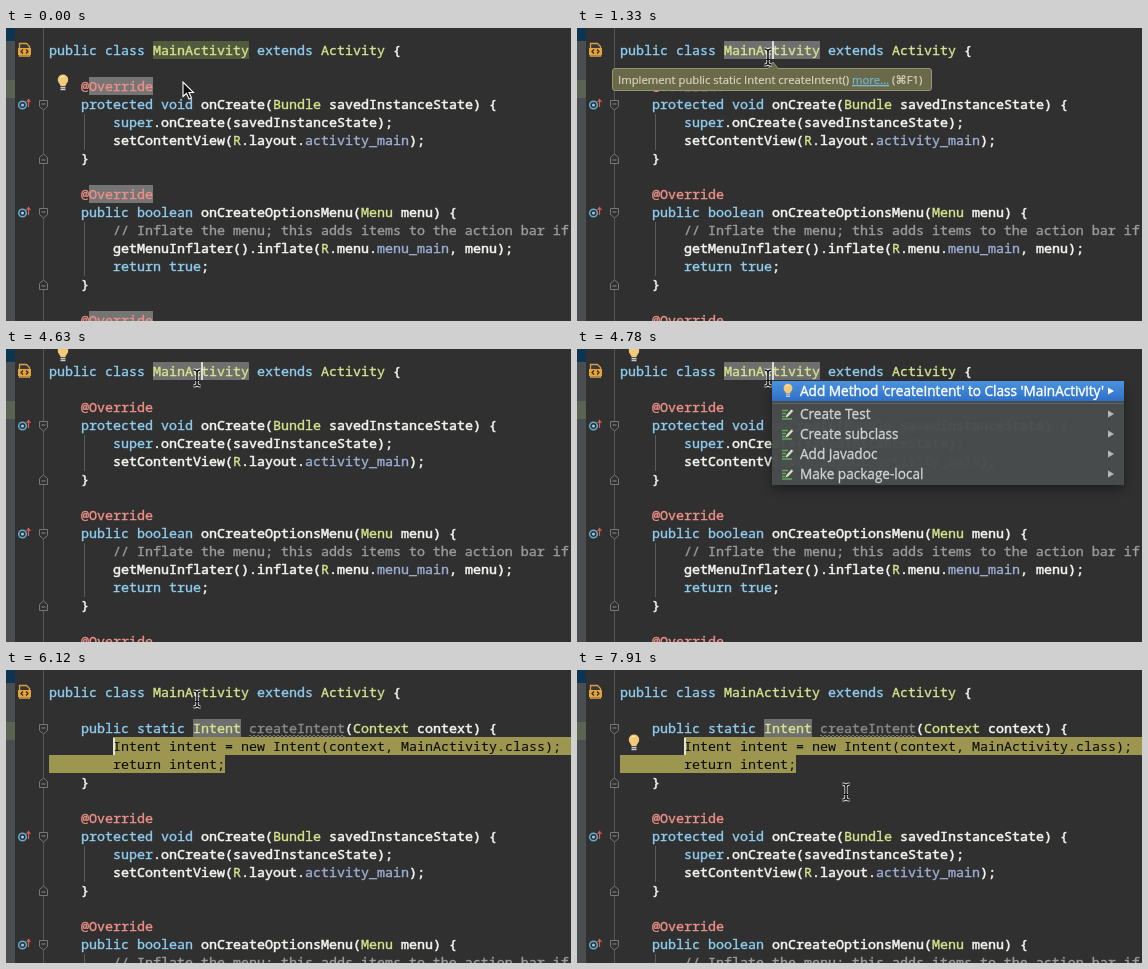
An HTML page that plays this animation: 565x293 px, repeating every 8.01 s.

```html
<!DOCTYPE html>
<html lang="en">
<head>
<meta charset="utf-8">
<style>
  html, body { margin: 0; width: 100%; height: 100%; overflow: hidden; background: #303030; }
  svg { display: block; width: 565px; height: 293px; }
  text { white-space: pre; }
  text, tspan { fill: currentColor; stroke: currentColor; }
  .code { font: 500 13.333px "Noto Sans Mono", "DejaVu Sans Mono", monospace; color: #f6f6f2; stroke-width: .5px; }
  .menu { font: 500 13.6px "Open Sans", "Noto Sans", sans-serif; color: #d2d2d2; stroke-width: .3px; }
  .menu.active { color: #fff; stroke-width: .4px; }
  .tip { font: 500 11.3px "Open Sans", "DejaVu Sans", sans-serif; color: #d8d6bd; stroke-width: .2px; }
  .link { color: #74b9d8; text-decoration: underline; }
  .key { color: #8fcdf0; stroke-width: .35px; }
  .type { color: #d8e48c; stroke-width: .35px; }
  .note { color: #ee9088; stroke-width: .35px; }
  .field { color: #9fb0d6; stroke-width: .35px; }
  .comment { color: #9c9c9c; stroke-width: .35px; }
  .unused { color: #8a8a8a; stroke-width: .35px; }
  .plain .type { color: #f6f6f2; stroke-width: .5px; }
  .code .ink, .code .ink tspan { color: #0c0c08; stroke-width: .1px; }
</style>
</head>
<body>
<svg id="stage" viewBox="0 0 565 293" xmlns="http://www.w3.org/2000/svg">
  <defs>
    <linearGradient id="blue" x2="0" y2="1">
      <stop stop-color="#4a92de"/><stop offset="1" stop-color="#2f70c8"/>
    </linearGradient>
    <filter id="shadow" x="-10%" y="-20%" width="120%" height="150%">
      <feDropShadow dx="0" dy="5" stdDeviation="6" flood-color="#000" flood-opacity=".4"/>
    </filter>
    <g id="bulb">
      <path d="M-2.500 3C-2.500 1-5.200 0-5.200-3.500A5.200 5 0 0 1 5.200-3.500C5.200 0 2.500 1 2.500 3Z" fill="#f3ca7a"/>
      <path d="M-2.500-5.500Q-1-7 1-6.500" fill="none" stroke="#fff0c4"/>
      <path d="M-2.500 4.500H2.500M-2.500 6.500H2.500" stroke="#c8c8c8" stroke-width="1.300"/>
    </g>
    <g id="override">
      <circle cx="-1.500" cy="1" r="3.800" fill="#303030" stroke="#62acd0" stroke-width="1.500"/>
      <circle cx="-1.500" cy="1" r="1.600" fill="#8cc6e0"/>
      <path d="M4.500 3V-4M2.500-2L4.500-4.500L6.500-2" fill="none" stroke="#d95f55" stroke-width="1.200"/>
    </g>
    <g id="fold">
      <path d="M-4-4.500H4V1.500L0 5L-4 1.500Z" fill="#303030" stroke="#777"/>
      <path d="M-2-1H2" stroke="#8a8a8a"/>
    </g>
    <g id="pencil">
      <path d="M-6-3.500H0M-6-.5H-2M-6 2.500H-3M-6 5H4" stroke="#62a958" stroke-width="1.400"/>
      <path d="M-3 4L-2 1L3.500-5L5.500-3L0 3Z" fill="#dcdccf" stroke="#45553f" stroke-width=".7"/>
    </g>
    <g id="beamShape">
      <path d="M-3.500-8Q0-8 0-5Q0-8 3.500-8M0-5.500V5.500M-3.500 8Q0 8 0 5Q0 8 3.500 8M-2 2.500H2" fill="none"/>
    </g>
  </defs>

  <rect width="565" height="293" fill="#303030"/>
  <rect width="9" height="293" fill="#4b4e50"/>
  <rect width="9" height="13" fill="#0d3552"/>
  <rect y="52" width="9" height="18" fill="#5a6452"/>
  <path d="M37.500 0V293" stroke="#565656"/>
  <g>
    <path d="M13.500 28V15.500H20.500L23.500 18.500V28Z" fill="#3a3834" stroke="#d9a04a" stroke-width="1.300"/>
    <rect x="12" y="20" width="13" height="7" fill="#e3a33f"/>
    <path d="M17 21.500L15 23.500L17 25.500M20 21.500L22 23.500L20 25.500" fill="none" stroke="#33270f" stroke-width="1.200"/>
  </g>

  <rect id="classMark" x="147" y="13" width="96" height="18"/>
  <g id="head" class="code"></g>
  <g id="method">
    <rect x="107" y="67" width="458" height="18" fill="#9c9650"/>
    <rect x="43" y="85" width="176" height="18" fill="#9c9650"/>
    <rect id="intentMark" x="187" y="49" width="48" height="18" fill="#6f6f6f"/>
    <g id="methodText" class="code"></g>
    <path id="wave" fill="none" stroke="#8a8a8a" stroke-width=".8"/>
    <g id="methodFolds"></g>
    <path d="M108 68V85" stroke="#fff" stroke-width="1.500"/>
  </g>
  <g id="rest">
    <g id="noteMarks" fill="#757575"></g>
    <path d="M78.500 86V122M78.500 194V248" stroke="#5a5a5a"/>
    <g id="restText" class="code"></g>
    <g id="gutter"></g>
  </g>

  <path id="caret" d="M196 13V31" stroke="#fff" stroke-width="1.500"/>
  <use id="lamp" href="#bulb"/>

  <g id="tip">
    <path d="M38 40.500H191L196 34L201 40.500H352Q354.500 40.500 354.500 43V60Q354.500 62.500 352 62.500H38Q35.500 62.500 35.500 60V43Q35.500 40.500 38 40.500Z" fill="#6a6a4a" stroke="#96957a"/>
    <text class="tip" x="41" y="56">Implement public static Intent createIntent() <tspan class="link">more...</tspan> (⌘F1)</text>
  </g>

  <g id="menu">
    <rect x="195" y="32" width="352" height="104" fill="#494c4e" fill-opacity=".96" filter="url(#shadow)"/>
    <rect x="195" y="32" width="352" height="20" fill="url(#blue)"/>
    <path d="M196 54.500H546" stroke="#626567"/>
    <g id="items"></g>
  </g>

  <path id="arrow" d="M0 0V14.500L3.500 11.500L6 17L8.500 16L6 10.500H10.500Z" fill="#111" stroke="#fff" stroke-width="1.100"/>
  <g id="beam">
    <use href="#beamShape" stroke="#fff" stroke-width="3"/>
    <use href="#beamShape" stroke="#111" stroke-width="1.600"/>
  </g>
</svg>
<script>
const LOOP = 8010, CELL = 8, ROW = 18, LEFT = 43;
const $ = id => document.getElementById(id);

const kinds = {
  key: "public class extends protected void super boolean return true static new".split(" "),
  type: "MainActivity Activity Bundle R Menu Intent Context".split(" "),
  field: ["activity_main", "menu_main"]
};

function add(parent, tag, attrs = {}, content = "") {
  const el = document.createElementNS("http://www.w3.org/2000/svg", tag);
  for (const name in attrs) el.setAttribute(name, attrs[name]);
  el.textContent = content;
  parent.appendChild(el);
  return el;
}

function kindOf(word) {
  if (word.startsWith("@")) return "note";
  if (word.startsWith("//")) return "comment";
  return Object.keys(kinds).find(kind => kinds[kind].includes(word)) || "";
}

function codeLine(parent, row, indent, source) {
  const line = add(parent, "text", { x: LEFT + indent * CELL, y: 27 + row * ROW });
  for (const word of source.match(/\/\/.*|@?\w+|[^\w@/]+/g)) {
    add(line, "tspan", { class: kindOf(word) }, word);
  }
  return line;
}

function foldPair(parent, top, bottom) {
  add(parent, "use", { href: "#fold", transform: `translate(37.5 ${top})` });
  add(parent, "use", { href: "#fold", transform: `translate(37.5 ${bottom}) scale(1 -1)` });
}

codeLine($("head"), 0, 0, "public class MainActivity extends Activity {");

const signature = codeLine($("methodText"), 2, 4, "public static Intent createIntent(Context context) {");
const methodName = [...signature.children].find(el => el.textContent === "createIntent");
codeLine($("methodText"), 3, 8, "Intent intent = new Intent(context, MainActivity.class);").setAttribute("class", "ink");
codeLine($("methodText"), 4, 8, "return intent;").setAttribute("class", "ink");
codeLine($("methodText"), 5, 4, "}");
foldPair($("methodFolds"), 59, 113);
$("wave").setAttribute("d", "M243 66" + "q1 -2 2 0t2 0".repeat(24));

[
  [2, 4, "@Override"],
  [3, 4, "protected void onCreate(Bundle savedInstanceState) {"],
  [4, 8, "super.onCreate(savedInstanceState);"],
  [5, 8, "setContentView(R.layout.activity_main);"],
  [6, 4, "}"],
  [8, 4, "@Override"],
  [9, 4, "public boolean onCreateOptionsMenu(Menu menu) {"],
  [10, 8, "// Inflate the menu; this adds items to the action bar if it is present."],
  [11, 8, "getMenuInflater().inflate(R.menu.menu_main, menu);"],
  [12, 8, "return true;"],
  [13, 4, "}"],
  [15, 4, "@Override"]
].forEach(args => codeLine($("restText"), ...args));

for (const row of [2, 8, 15]) {
  add($("noteMarks"), "rect", { x: 83, y: 13 + row * ROW, width: 64, height: ROW });
}
for (const [top, bottom] of [[77, 131], [185, 257]]) {
  foldPair($("gutter"), top, bottom);
  add($("gutter"), "use", { href: "#override", x: 18, y: top - 1 });
}

["Add Method 'createIntent' to Class 'MainActivity'", "Create Test", "Create subclass",
 "Add Javadoc", "Make package-local"].forEach((label, i) => {
  const y = i ? 45 + i * 20 : 42;
  const icon = i ? "#pencil" : "#bulb";
  add($("items"), "use", { href: icon, transform: `translate(211 ${y}) scale(${i ? 1 : 0.85})` });
  add($("items"), "text", { class: i ? "menu" : "menu active", x: 223, y: y + 4.5 }, label);
  add($("items"), "path", { d: `M531 ${y - 3.5}L537 ${y}L531 ${y + 3.5}Z`, fill: i ? "#b8b8b8" : "#fff" });
});

// Pointer stops: time, x, y
const pointer = [
  [0, 177, 54], [150, 178, 52], [300, 182, 45], [450, 187, 36], [600, 190, 31], [740, 191, 29],
  [7020, 200, 52], [7170, 205, 62], [7320, 219, 85], [7470, 241, 112],
  [7620, 260, 128], [7760, 268, 130], [7910, 269, 122]
];
const blinks = [1630, 2230, 2680, 3130, 3730, 4180];

const show = (id, on) => $(id).setAttribute("visibility", on ? "visible" : "hidden");
const place = (id, x, y) => $(id).setAttribute("transform", `translate(${x} ${y})`);

function render(t) {
  const within = (from, to) => t >= from && t < to;
  const inserted = t >= 5680, analysed = t >= 5980;

  show("method", inserted);
  place("rest", 0, inserted ? 90 : 0);
  show("noteMarks", t < 1030);
  show("classMark", !analysed);
  $("classMark").setAttribute("fill", t < 1030 ? "#515a3d" : "#6f6f6f");

  $("methodText").setAttribute("class", analysed ? "code" : "code plain");
  methodName.setAttribute("class", analysed ? "unused" : "");
  // Hidden children would otherwise override a hidden parent
  for (const id of ["intentMark", "wave", "methodFolds"]) show(id, analysed);

  const flips = blinks.filter(time => time <= t).length;
  show("caret", within(740, 5680) && flips % 2 === 0);

  const lampY = t < 740 ? 55 : inserted ? 73 : 5;
  place("lamp", 57, lampY);
  show("lamp", t < 740 || within(4630, 5680) || t >= 6720);

  show("tip", within(1180, 4630));
  $("tip").setAttribute("opacity", t < 1330 ? 0.5 : 1);
  show("menu", within(4780, 5680));

  const [, x, y] = pointer.filter(stop => stop[0] <= t).pop();
  show("arrow", t < 150);
  show("beam", t >= 150);
  place("arrow", x, y);
  place("beam", x, y);
}

const start = performance.now();
function tick() {
  render((performance.now() - start) % LOOP);
  requestAnimationFrame(tick);
}
tick();
</script>
</body>
</html>
```
